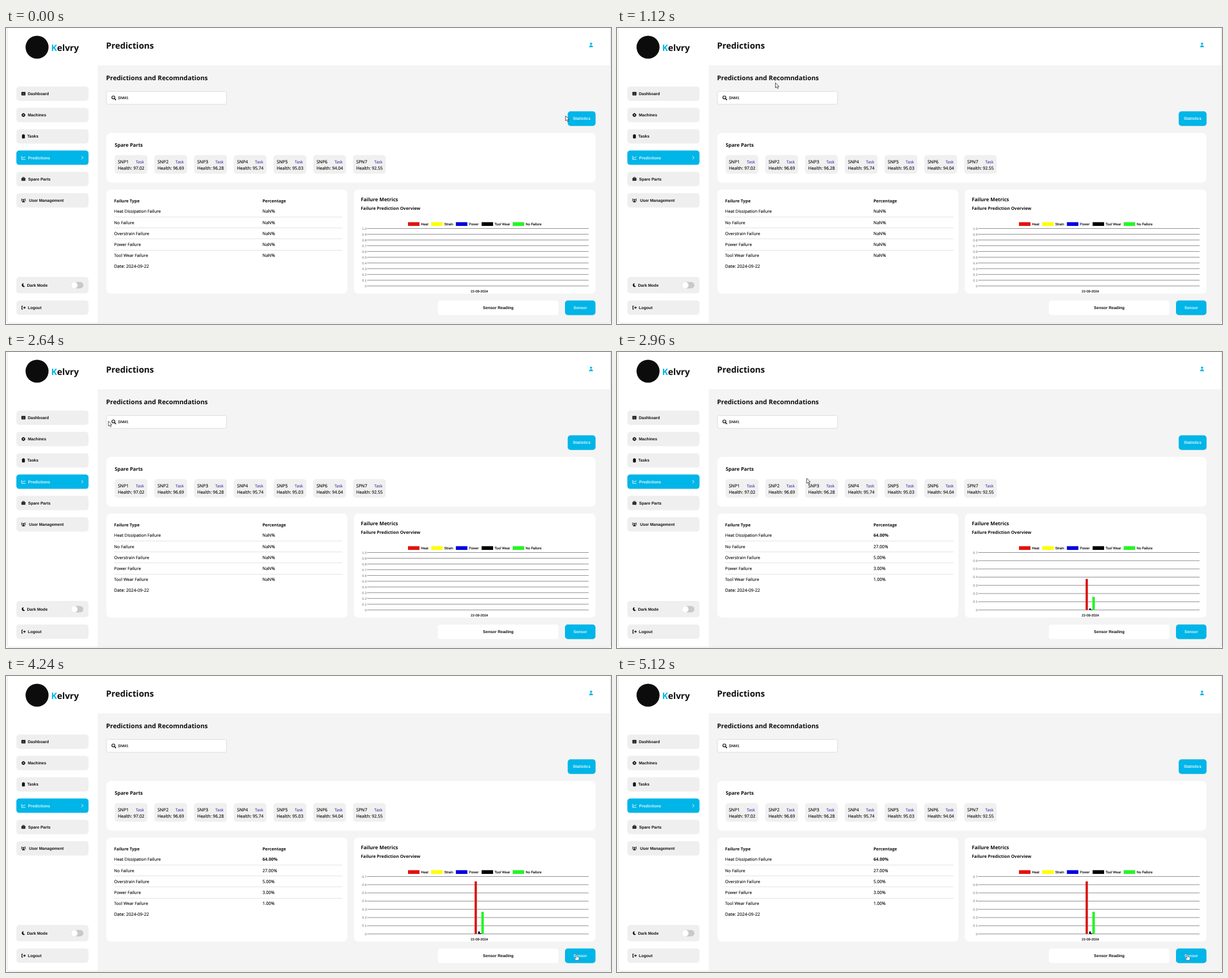
These frames come from a looping animation (1052x516 px, 5.36 s). An HTML page:

```html
<!DOCTYPE html>
<html lang="en">
<head>
<meta charset="utf-8">
<title>Predictions dashboard</title>
<style>
  html, body { margin: 0; width: 100%; height: 100%; overflow: hidden; background: #fff; }
  svg { display: block; width: 100%; height: 100%; }
  text { font-family: "Open Sans", "Noto Sans", sans-serif; fill: #0e0e0e; text-rendering: geometricPrecision; white-space: pre; }
  .arial { font-family: "Liberation Sans", Arial, sans-serif; }
  .bold { font-weight: 700; }
  .dense { stroke: #0e0e0e; stroke-width: 0.15px; }
</style>
</head>
<body>
<svg id="stage" viewBox="0 0 1052 516" preserveAspectRatio="none"></svg>
<script>
const LOOP = 5360, STEP = 80;
const LOAD = 2800, GROW = 800, HAND = 4240;
const BLUE = '#00b5e8', GREY = '#efefef', INK = '#111';
const stage = document.getElementById('stage');

function add(tag, attrs, parent = stage) {
  const el = document.createElementNS('http://www.w3.org/2000/svg', tag);
  for (const key in attrs) el.setAttribute(key, attrs[key]);
  parent.appendChild(el);
  return el;
}
const group = (attrs = {}, parent = stage) => add('g', attrs, parent);
const rect = (x, y, width, height, fill, rx = 0, more = {}, parent = stage) =>
  add('rect', { x, y, width, height, fill, rx, ...more }, parent);
const path = (d, more = {}, parent = stage) => add('path', { d, fill: INK, ...more }, parent);
const line = (x1, x2, y, stroke, parent = stage) =>
  add('line', { x1, x2, y1: y, y2: y, stroke, 'stroke-width': 1 }, parent);
function text(str, x, y, size, cls = '', more = {}, parent = stage) {
  const el = add('text', { x, y, 'font-size': size, class: cls, ...more }, parent);
  el.textContent = str;
  return el;
}
const stroke = (color, width) => ({ fill: 'none', stroke: color, 'stroke-width': width });
const middle = { 'text-anchor': 'middle' };
const pale = { style: 'fill:#e2f6fd' };

// Icons are drawn around their own centre.
const icons = {
  table(g) {
    rect(-3.5, -3, 7, 6, INK, 0.8, {}, g);
    path('M-2.7-.6H2.7M-2.7 1.2H2.7M0-1.2V2.4', stroke('#888', 0.5), g);
  },
  gear(g) {
    add('circle', { r: 2, ...stroke(INK, 1.8) }, g);
    add('circle', { r: 2.9, ...stroke(INK, 1), 'stroke-dasharray': '1.3 .978' }, g);
  },
  clipboard(g) {
    rect(-2.5, -2.8, 5, 6.3, INK, 0.8, {}, g);
    rect(-1.2, -3.7, 2.4, 1.8, INK, 0.6, {}, g);
  },
  chart(g) {
    path('M-3-3V3H3.5M-1.7 1L0-1L1.2.2L3.2-2.2', stroke('#fff', 0.9), g);
  },
  briefcase(g) {
    rect(-3.5, -1.7, 7, 4.7, INK, 0.8, {}, g);
    path('M-1.5-1.7V-3H1.5V-1.7', stroke(INK, 0.9), g);
    path('M-3.5.7H3.5', stroke('#bbb', 0.5), g);
  },
  users(g) {
    for (const [x, y, r] of [[-2.8, -2, 1], [2.8, -2, 1], [0, -0.9, 1.3]]) add('circle', { cx: x, cy: y, r, fill: INK }, g);
    path('M-2.5 3.2Q-2.4.8 0 .8T2.5 3.2ZM-4.3 1Q-4.2-.7-2-.5L-2.4 1ZM4.3 1Q4.2-.7 2-.5L2.4 1Z', {}, g);
  },
  moon(g) {
    path('M.6-3.2A3.2 3.2 0 1 0 2.8 2A3 3 0 0 1 .6-3.2Z', {}, g);
  },
  logout(g) {
    path('M-1-2.6H-2.8V2.6H-1M-1 0H3M1.4-1.8L3.2 0L1.4 1.8', stroke(INK, 1.1), g);
  }
};

function menuItem(label, icon, x, y, h, active) {
  rect(18, y, 125.5, h, active ? BLUE : GREY, 5);
  const mid = y + h / 2;
  icons[icon](group({ transform: `translate(30.3 ${mid})` }));
  text(label, x, mid + 2.4, 7, 'arial bold', active ? pale : {});
}

function button(label, x, y, w) {
  rect(x, y, w, 25.5, BLUE, 5);
  text(label, x + w / 2, y + 15.1, 6.9, 'arial bold', { ...middle, ...pale });
}

function drawFrame() {
  rect(0, 0, 1052, 516, '#fff');
  rect(159.5, 65, 891, 449.5, '#f4f4f4');
  path('M2 0V509Q2 514.7 7 514.7H1046Q1051 514.7 1051 509V0', stroke('#dedede', 1));
}

function drawSidebar() {
  add('circle', { cx: 54, cy: 33.5, r: 20, fill: '#0c0c0c' });
  const brand = text('', 78.5, 40, 15.3, 'bold');
  add('tspan', { style: `fill:${BLUE}` }, brand).textContent = 'K';
  add('tspan', {}, brand).textContent = 'elvry';

  const items = [['Dashboard', 'table', 38], ['Machines', 'gear', 38], ['Tasks', 'clipboard', 37],
    ['Predictions', 'chart', 38.5], ['Spare Parts', 'briefcase', 38.5], ['User Management', 'users', 40]];
  items.forEach(([label, icon, x], i) => menuItem(label, icon, x, 102 + 37.2 * i, 25, i === 3));
  path('M131.3 223.3L134 226.1L131.3 228.9', stroke('#fff', 0.9));

  menuItem('Dark Mode', 'moon', 36.5, 434, 28.5);
  rect(113, 442.8, 21.5, 11.2, '#c9c9c9', 5.6);
  add('circle', { cx: 118.8, cy: 448.4, r: 5.6, fill: '#fff' });
  menuItem('Logout', 'logout', 38, 475, 25);
}

function drawHeader() {
  text('Predictions', 174, 35.6, 14.8, 'bold');
  add('circle', { cx: 1017.3, cy: 27.3, r: 1.9, fill: BLUE });
  path('M1014 33.4Q1014 29.9 1017.3 29.9T1020.6 33.4Z', { fill: BLUE });

  text('Predictions and Recomndations', 174, 91, 11.2, 'bold');
  rect(174.5, 110.5, 209, 22.5, '#fff', 3, { stroke: '#dcdcdc' });
  add('circle', { cx: 186.7, cy: 121.1, r: 2.6, ...stroke(INK, 1.2) });
  path('M188.6 123L191.2 125.6', stroke(INK, 1.5));
  text('SNM1', 194.5, 124.3, 6.6, 'arial dense');
  button('Statistics', 976.7, 145.3, 48.5);
}

function drawParts() {
  rect(174.5, 183, 850.5, 86.5, '#fff', 8);
  text('Spare Parts', 189, 207, 8.6, 'bold');
  const health = [97.02, 96.69, 96.28, 95.74, 95.03, 94.04, 92.55];
  health.forEach((value, i) => {
    const x = 188.8 + 69.1 * i;
    rect(x, 221.5, 57, 32.5, '#f0f0f0', 5);
    text((i === 6 ? 'SPN' : 'SNP') + (i + 1), x + 5.6, 235.6, 7.7, 'dense');
    text('Task', x + 36.9, 235.6, 7.1, '', { style: 'fill:#21139c' });
    text('Health: ' + value.toFixed(2), x + 5.6, 246.8, 7.5, 'dense');
  });
}

let cells;
const shares = [64, 27, 5, 3, 1];
function drawTable() {
  rect(174.5, 281.5, 419, 181.5, '#fff', 8);
  text('Failure Type', 188, 303.6, 7.3, 'bold');
  text('Percentage', 446, 303.6, 7.3, 'bold');
  const rows = ['Heat Dissipation', 'No', 'Overstrain', 'Power', 'Tool Wear'];
  cells = rows.map((name, i) => {
    const y = 322.3 + 19.25 * i;
    text(name + ' Failure', 188, y, 7.35, 'dense');
    if (i < 4) line(188, 585, Math.round(y + 6.5) + 0.5, '#e3e3e3');
    return text('NaN%', 446, y, 7.5, 'dense');
  });
  text('Date: 2024-09-22', 188, 418.2, 7.65, 'dense');
}

const TOP = 349.5, BASE = 449.7;
function drawAxis(steps) {
  const g = group();
  for (let i = 0; i <= steps; i++) {
    const y = BASE - (BASE - TOP) * i / steps;
    line(628, 1013, y, '#8c8c8c', g);
    text(i ? (i / 10).toFixed(1) : '0', 627, y + 2, 5.6, 'arial', { 'text-anchor': 'end', style: 'fill:#666' }, g);
  }
  return g;
}

let emptyAxis, dataAxis, bars;
function drawChart() {
  rect(605, 281.5, 420, 181.5, '#fff', 8);
  text('Failure Metrics', 617, 302.4, 8.7, 'bold');
  text('Failure Prediction Overview', 617, 316.7, 7.5, 'bold');
  const legend = [['Heat', 699, '#e3120f'], ['Strain', 739.3, '#ffff00'], ['Power', 782.3, '#0000e0'],
    ['Tool Wear', 827, '#050505'], ['No Failure', 881, '#27f527']];
  for (const [label, x, color] of legend) {
    rect(x, 338.5, 20, 6.5, color);
    text(label, x + 22.6, 343.9, 6, 'arial dense');
  }
  emptyAxis = drawAxis(10);
  dataAxis = drawAxis(7);
  bars = [[814.8, 4, 0.64, '#dc1414'], [821, 3, 0.03, '#08083c'], [824, 2.6, 0.01, '#050505'], [826.5, 4.4, 0.27, '#27f527']]
    .map(([x, w, value, color]) => ({ value, el: rect(x, BASE, w, 0, color) }));
  text('22-09-2024', 823, 460.6, 5.9, 'arial dense', middle);
}

function drawFooter() {
  rect(751, 475.3, 209.5, 25, '#fff', 4);
  text('Sensor Reading', 856, 490, 7, 'arial bold', middle);
  button('Sensor', 972, 475, 53);
}

let arrow, hand;
function drawCursors() {
  const look = { fill: '#fff', stroke: '#3c3c3c', 'stroke-width': 0.9, 'stroke-linejoin': 'round' };
  arrow = path('M0 0V8.8L2 7L3.5 10L5 9.3L3.6 6.4H6.2Z', look);
  hand = path('M-.9 .6Q0-.6.9.6V4L3.8 4.8Q4.7 5.2 4.5 6.4L3.6 10H-1.2L-3.8 6.5Q-3.8 5.2-2.6 5.7L-.9 7Z', { ...look, stroke: '#555', 'stroke-width': 0.7 });
}

// Pointer stops: time, x, y.
const stops = [[0, 973, 153], [720, 290, 104], [1040, 282, 98], [1120, 275.5, 95.5], [1360, 258, 98],
  [1680, 200.5, 114], [2000, 178, 120.5], [2640, 178, 120.5], [3120, 383, 255], [3680, 924, 458],
  [3840, 930, 462], [4240, 992, 485.5], [LOOP, 992, 485.5]];

function pointerAt(t) {
  const i = Math.max(1, stops.findIndex(s => s[0] >= t));
  const [t0, x0, y0] = stops[i - 1], [t1, x1, y1] = stops[i];
  const p = (t - t0) / (t1 - t0), e = p * p * (3 - 2 * p);
  return [x0 + (x1 - x0) * e, y0 + (y1 - y0) * e];
}

const show = (el, on) => el.setAttribute('visibility', on ? 'visible' : 'hidden');

function render(time) {
  const t = Math.floor((time % LOOP) / STEP) * STEP;
  const loaded = t >= LOAD;
  cells.forEach((cell, i) => {
    cell.textContent = loaded ? shares[i].toFixed(2) + '%' : 'NaN%';
    cell.setAttribute('class', loaded && i === 0 ? 'bold' : 'dense');
  });
  show(emptyAxis, !loaded);
  show(dataAxis, loaded);
  const p = Math.min(1, Math.max(0, (t - LOAD) / GROW));
  const grown = 1 - (1 - p) ** 4;
  for (const { el, value } of bars) {
    const h = (BASE - TOP) * value / 0.7 * grown;
    el.setAttribute('y', BASE - h);
    el.setAttribute('height', h);
  }
  const [x, y] = pointerAt(t);
  for (const el of [arrow, hand]) el.setAttribute('transform', `translate(${x} ${y})`);
  show(arrow, t < HAND);
  show(hand, t >= HAND);
}

[drawFrame, drawSidebar, drawHeader, drawParts, drawTable, drawChart, drawFooter, drawCursors].forEach(draw => draw());

const start = performance.now();
function tick() {
  render(performance.now() - start);
  requestAnimationFrame(tick);
}
tick();
</script>
</body>
</html>
```
